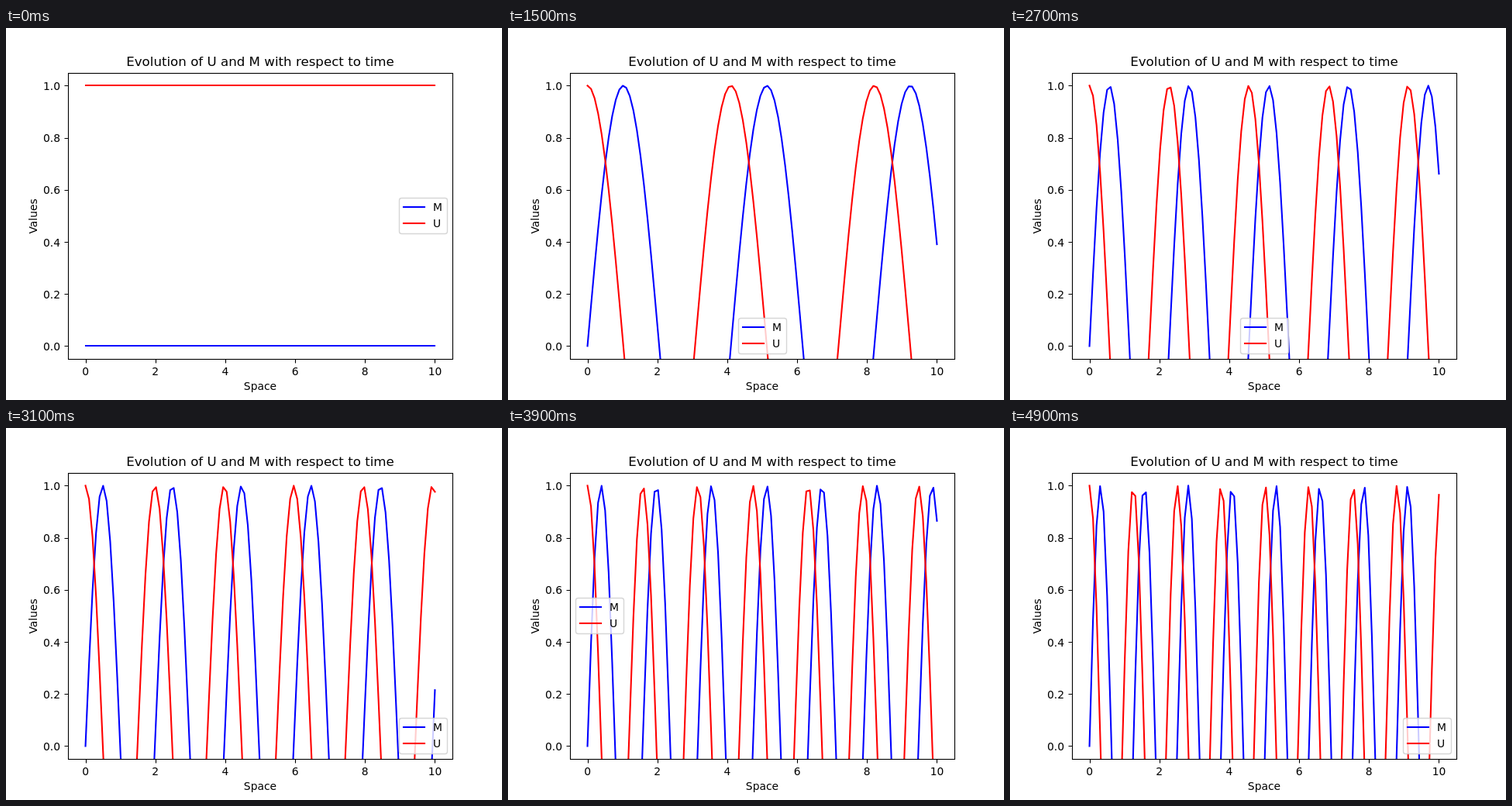
An HTML page that plays this animation: 640x480 px, repeating every 5000 ms.

```html
<!DOCTYPE html>
<html lang="en">
<head>
<meta charset="utf-8">
<title>Evolution of U and M</title>
<style>
  html, body { margin: 0; width: 100%; height: 100%; overflow: hidden; background: #fff; }
  svg { display: block; width: 640px; height: 480px; }
  text { font: 13.89px "DejaVu Sans", sans-serif; fill: #000; }
  .title { font-size: 16.67px; }
  .mid { text-anchor: middle; }
  .axis { fill: none; stroke: #000; stroke-width: 1.11; }
  .curve { fill: none; stroke-width: 2.083; stroke-linejoin: round; stroke-linecap: square; }
  .m { stroke: #00f; }
  .u { stroke: #f00; }
  .frame { fill: #fff; fill-opacity: .8; stroke: #ccc; stroke-opacity: .8; stroke-width: 1.39; }
</style>
</head>
<body>
<svg id="stage" viewBox="0 0 640 480">
  <clipPath id="plot"><rect x="80" y="58" width="496" height="369"/></clipPath>
</svg>
<script>
const NS = "http://www.w3.org/2000/svg";
const stage = document.getElementById("stage");
const STEPS = 50, STEP_MS = 100, POINTS = 100, MAX_K = 5;
const AXES = { left: 80, right: 576, top: 57.6, bottom: 427.2 };
const PAD = 6.944;
const BOX = { w: 62, h: 46.06 };

const px = x => 102.545 + x * 45.0909;
const py = y => 410.4 - y * 336;
const snap = v => Math.floor(v + 0.5) + 0.5;

function add(tag, attrs, text, parent = stage) {
  const el = document.createElementNS(NS, tag);
  for (const name in attrs) el.setAttribute(name, attrs[name]);
  if (text) el.textContent = text;
  parent.appendChild(el);
  return el;
}

function set(el, attrs) {
  for (const name in attrs) el.setAttribute(name, attrs[name]);
}

// Ticks and their labels
let ticks = "";
for (let i = 0; i <= 5; i++) {
  const x = px(2 * i), y = py(i / 5);
  ticks += `M${snap(x)} 427.5v5M75.5 ${snap(y)}h5`;
  add("text", { x, y: 448, class: "mid" }, String(2 * i));
  add("text", { x: 48, y: Math.round(y + 5.5) }, (i / 5).toFixed(1));
}
add("path", { d: ticks, class: "axis" });
add("text", { x: 328, y: 49, class: "mid title" }, "Evolution of U and M with respect to time");
add("text", { x: 328, y: 467, class: "mid" }, "Space");
add("text", { transform: "translate(40 242.9) rotate(-90)", class: "mid" }, "Values");

// Curves, spines, legend
const plot = add("g", { "clip-path": "url(#plot)" });
const curves = [
  { name: "M", cls: "curve m", fn: Math.sin },
  { name: "U", cls: "curve u", fn: Math.cos }
];
for (const c of curves) c.path = add("path", { class: c.cls }, "", plot);
add("rect", { x: 80.5, y: 58.5, width: 496, height: 369, class: "axis" });

const frame = add("path", { class: "frame" });
for (const c of curves) {
  c.key = add("path", { class: c.cls });
  c.label = add("text", {}, c.name);
}

// Legend places in order of preference
const lo = AXES.left + PAD, hi = AXES.right - PAD - BOX.w;
const up = AXES.top + PAD, down = AXES.bottom - PAD - BOX.h;
const cx = (lo + hi) / 2, cy = (up + down) / 2;
const PLACES = [
  [hi, up], [lo, up], [lo, down], [hi, down], [hi, cy],
  [lo, cy], [hi, cy], [cx, down], [cx, up], [cx, cy]
];

function crosses([x1, y1], [x2, y2], mx, my) {
  const dx = Math.abs(x1 - x2), dy = Math.abs(y1 - y2);
  return Math.abs(x1 + x2 - 2 * mx) < dx + BOX.w &&
    Math.abs(y1 + y2 - 2 * my) < dy + BOX.h &&
    2 * Math.abs((x1 - mx) * (y1 - y2) - (y1 - my) * (x1 - x2)) < BOX.w * dy + BOX.h * dx;
}

// Points covered by the legend, plus one for each curve that touches it
function overlap(lines, [x, y]) {
  const mx = x + BOX.w / 2, my = y + BOX.h / 2;
  let score = 0;
  for (const pts of lines) {
    score += pts.filter(p => p[0] > x && p[0] < x + BOX.w && p[1] > y && p[1] < y + BOX.h).length;
    if (pts.some((p, i) => i > 0 && crosses(pts[i - 1], p, mx, my))) score++;
  }
  return score;
}

function bestPlace(lines) {
  let best = PLACES[0], least = Infinity;
  for (const place of PLACES) {
    const score = overlap(lines, place);
    if (score < least) {
      least = score;
      best = place;
    }
  }
  return best;
}

function placeLegend([x, y]) {
  const l = snap(x), r = snap(x + BOX.w), t = snap(y), b = snap(y + BOX.h);
  set(frame, {
    d: `M${l + 3} ${b}H${r - 3}Q${r} ${b} ${r} ${b - 3}V${t + 3}Q${r} ${t} ${r - 3} ${t}` +
       `H${l + 3}Q${l} ${t} ${l} ${t + 3}V${b - 3}Q${l} ${b} ${l + 3} ${b}Z`
  });
  curves.forEach((c, i) => {
    const base = y + 16.56 + i * 20.94;
    const from = Math.round(x + 5.56), to = Math.round(x + 33.33);
    set(c.key, { d: `M${from} ${Math.round(base - 4.86)}H${to}` });
    set(c.label, { x: Math.round(x + 44.44), y: Math.round(base) });
  });
}

function draw(step) {
  const k = MAX_K * step / (STEPS - 1);
  const lines = curves.map(c => Array.from({ length: POINTS }, (_, i) => {
    const x = 10 * i / (POINTS - 1);
    return [px(x), py(c.fn(k * x))];
  }));
  curves.forEach((c, i) => {
    // Flat lines sit on whole pixels
    const pts = k ? lines[i] : lines[i].map(p => p.map(Math.round));
    set(c.path, { d: "M" + pts.map(p => p[0].toFixed(2) + " " + p[1].toFixed(2)).join("L") });
  });
  placeLegend(bestPlace(lines));
}

const start = performance.now();
let shown = -1;
function tick() {
  const step = Math.floor((performance.now() - start) / STEP_MS) % STEPS;
  if (step !== shown) draw(shown = step);
  requestAnimationFrame(tick);
}
tick();
</script>
</body>
</html>
```
